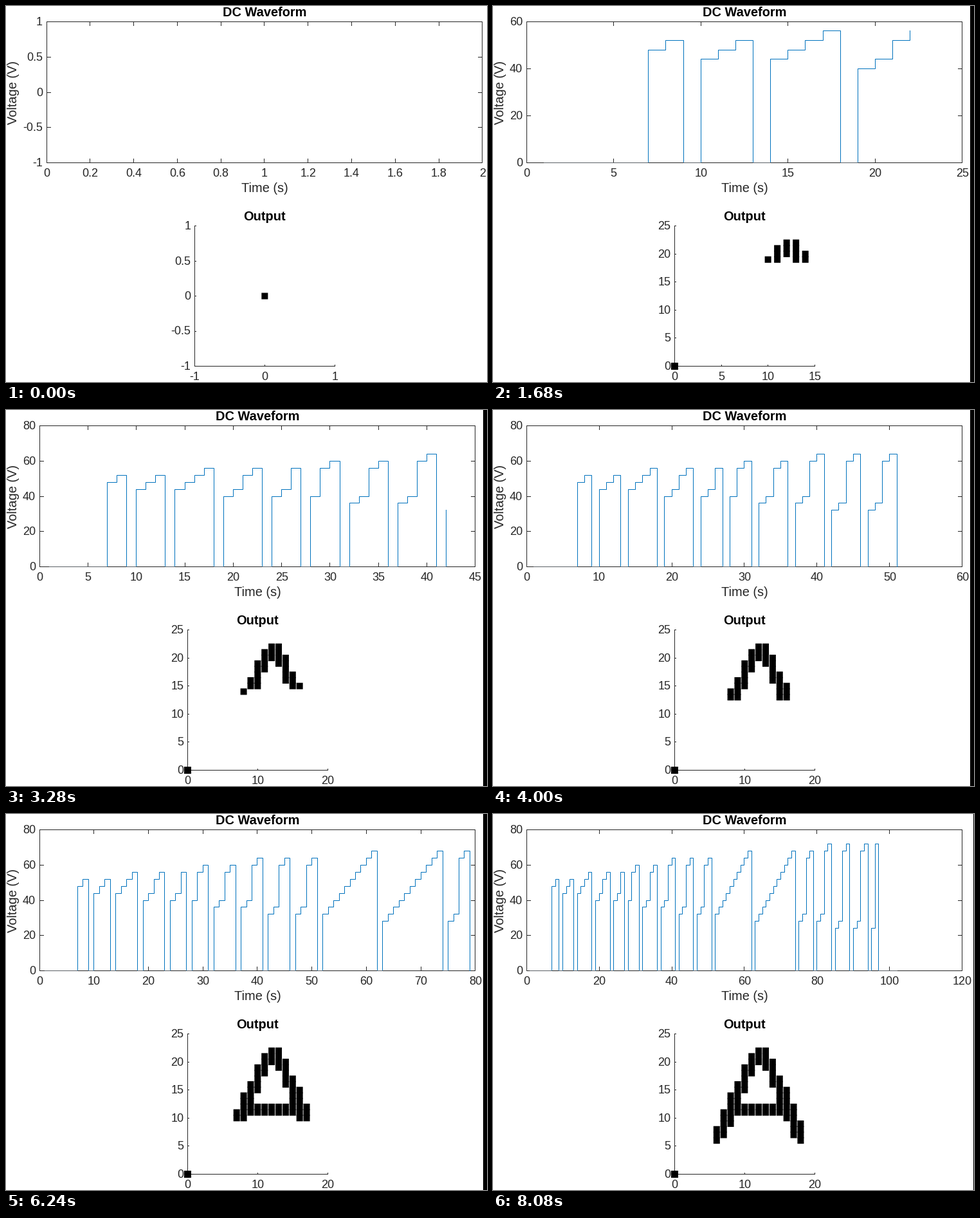
A matplotlib script for the animation above (8.16 s loop, 748 px wide and 584 px high).

```python
import math

import matplotlib.pyplot as plt
import numpy as np
from matplotlib.animation import FuncAnimation
from matplotlib.collections import PolyCollection
from matplotlib.patches import Rectangle

W, H, DPI = 748, 584, 100
PT = 72 / DPI                    # points per pixel
FRAMES, INTERVAL = 102, 80
INK, BLUE, BASE = "#262626", "#0072BD", "#5c6166"
SQUARE = np.array([(-4.5, -4.5), (5.5, -4.5), (5.5, 5.5), (-4.5, 5.5)])

# Columns lit on each scan line, from the top line down
TOP_LINE = 22
ROWS = [
    (12, 13), (11, 12, 13), (11, 12, 13, 14), (10, 11, 13, 14),
    (10, 11, 14), (10, 14, 15), (9, 10, 14, 15), (9, 10, 15, 16),
    (8, 9, 15, 16), (8, 9, 15, 16), range(8, 18), range(7, 18),
    (7, 8, 16, 17), (7, 8, 17, 18), (6, 7, 17, 18), (6, 7, 17, 18),
    (6, 18),
]


def scan():
    """One dot per second; the beam rests at the origin between lines."""
    dots = [(0, 0)] * 6
    for i, cols in enumerate(ROWS):
        dots += [(c, TOP_LINE - i) for c in cols] + [(0, 0)]
    dots += [(0, 0)] * (FRAMES - len(dots))
    return np.array(dots)


DOTS = scan()
VOLTS = DOTS[:, 0] * 4


def time_scale(t):
    if t == 1:
        return 0, 2, 0.2
    if t <= 11:
        step = 0.1 if t == 2 else 0.2 if t == 3 else 0.5 if t <= 6 else 1
        return 1, t, step
    if t <= 20 and t != 15:
        step = 2
    else:
        step = 5 if t <= 50 else 10 if t <= 100 else 20
    return 0, math.ceil(t / step) * step, step


def volt_scale(peak):
    if peak == 0:
        return -1, 1, 0.5
    if peak <= 50:
        return 0, 50, 10
    return 0, math.ceil(peak / 20) * 20, 20


def dot_scales(peak):
    if peak == 0:
        return (-1, 1, 1), (-1, 1, 0.5)
    return ((0, 15, 5) if peak <= 15 else (0, 20, 10)), (0, 25, 5)


def ticks(scale):
    lo, hi, step = scale
    return [round(lo + k * step, 3) for k in range(round((hi - lo) / step) + 1)]


def project(v, scale, a, b):
    lo, hi, _ = scale
    return a + (np.asarray(v, float) - lo) / (hi - lo) * (b - a)


fig = plt.figure(figsize=(W / DPI, H / DPI), dpi=DPI, facecolor="white")
ax = fig.add_axes([0, 0, 1, 1])


def line(xs, ys, color=INK, z=2):
    ax.plot(xs, ys, color=color, lw=PT, zorder=z,
            solid_capstyle="projecting", solid_joinstyle="miter")


def label(x, y, s, size=18, color=INK, ha="center", **kw):
    ax.text(x, y, s, fontsize=size * PT, color=color, ha=ha, va="baseline",
            family="Liberation Sans", **kw)


def title(x, y, s):
    label(x, y, s, 20, "black", weight="bold")


def panel(left, top, right, bottom, xs, ys, tick, boxed):
    """Draw an axes frame with inward ticks and tick labels."""
    if boxed:
        line([left, right, right, left, left], [bottom, bottom, top, top, bottom])
    else:
        line([left, left, right], [top, bottom, bottom])
    for v in ticks(xs):
        x = project(v, xs, left, right)
        line([x, x], [bottom, bottom - tick])
        if boxed:
            line([x, x], [top, top + tick])
        label(x + 0.5, bottom + 22, f"{v:g}")
    for v in ticks(ys):
        y = project(v, ys, bottom, top)
        line([left, left + tick], [y, y])
        if boxed:
            line([right, right - tick], [y, y])
        label(left - 5.5, y + 6, f"{v:g}", ha="right")


def draw_wave(left, right, t, xs, ys):
    top, bottom = 23.6, 243.4
    panel(left, top, right, bottom, xs, ys, 6, True)
    mid = (left + right + 1) / 2
    title(mid, 16, "DC Waveform")
    label(mid, 289, "Time (s)", 20)
    label(17, 134, "Voltage (V)", 20, rotation=90, rotation_mode="anchor")
    if t == 1:
        return
    sec = np.arange(1, t + 1)
    px = np.repeat(project(sec, xs, left, right), 2)[1:]
    v = np.repeat(VOLTS[:t], 2)[:-1]
    py = project(v, ys, bottom, top)
    line(px, py, BLUE, 3)
    if ys[0] == 0:
        line(px, np.where(v == 0, py, np.nan), BASE, 4)


def draw_output(left, t, peak):
    right, top, bottom = left + 217.7, 341, 559
    xs, ys = dot_scales(peak)
    panel(left, top, right, bottom, xs, ys, 2, False)
    title((left + right + 1) / 2, 333, "Output")
    centers = np.column_stack([project(DOTS[:t, 0], xs, left, right),
                               project(DOTS[:t, 1], ys, bottom, top)])
    ax.add_collection(PolyCollection(centers[:, None] + SQUARE, fc="black",
                                     lw=0, snap=False, zorder=5),
                      autolim=False)


def update(i):
    t = i + 1
    peak = VOLTS[:t].max()
    xs, ys = time_scale(t), volt_scale(peak)
    left = 62.6 if peak == 0 else 51.6
    right = left + 677.8

    ax.clear()
    ax.set(xlim=(0, W), ylim=(H, 0))
    ax.axis("off")
    draw_wave(left, right, t, xs, ys)
    draw_output(left + 230.4, t, peak // 4)

    # The view is cropped just past the last time label
    edge = int(right + 3 + 5 * len(f"{xs[1]:g}"))
    if edge < W:
        ax.add_patch(Rectangle((edge, 0), W - edge, H, fc="black", lw=0, zorder=9))
    return []


anim = FuncAnimation(fig, update, frames=FRAMES, init_func=lambda: [],
                     interval=INTERVAL, repeat=True, repeat_delay=0)
plt.show()
```
